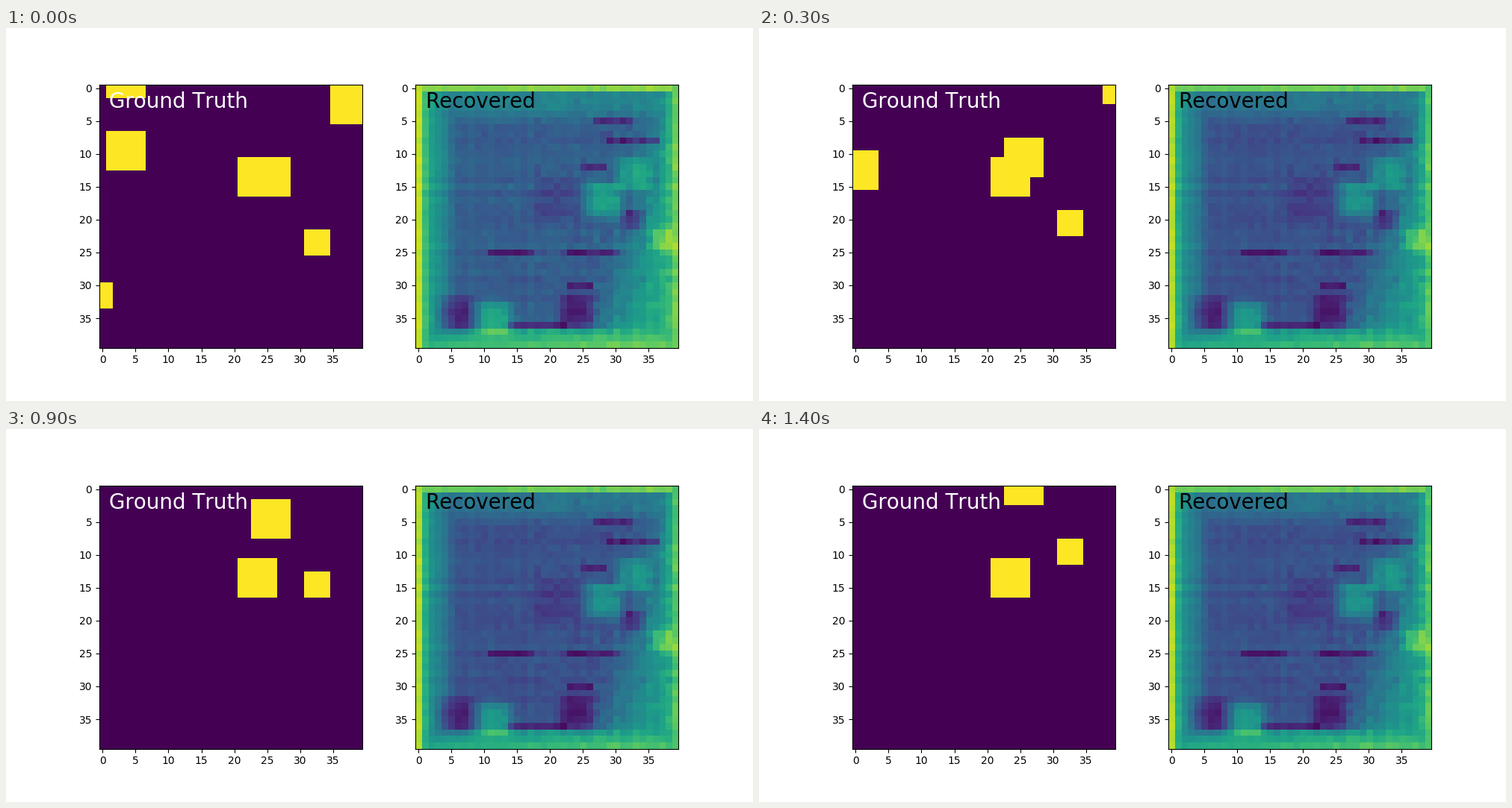
A matplotlib script that plays this animation: 1000 by 500 pixels, repeating every 1.5 s.

```python
import numpy as np
import matplotlib.pyplot as plt
from matplotlib.animation import FuncAnimation

SIZE = 40
FRAMES = 15
INTERVAL = 100

# Moving blocks of the truth map: row, column, size, row step, column step
BLOCKS = [
    (11, 21, 6, 0, 0),
    (11, 23, 6, -1, 0),
    (22, 31, 4, -1, 0),
    (0, 35, 6, -1, 1),
    (7, 1, 6, 1, -1),
    (30, -2, 4, 1, -1),
    (-4, 1, 6, -1, 0),
]

# Soft square clumps of the estimate: row, column, radius, change of level
CLUMPS = [
    (17, 28, 2.8, .26), (13, 32.5, 2.5, .24), (23, 37, 1.9, .2),
    (35, 11.5, 2.6, .28), (17, 21, 3.6, -.08), (20, 32.5, 1.6, -.2),
    (34, 24, 2.8, -.2), (34.5, 5.5, 2.7, -.19),
]
# Dark one-row streaks: row, first column, end column
STREAKS = [(5, 27, 33), (8, 29, 37), (12, 25, 29), (25, 23, 31),
           (25, 11, 18), (30, 23, 27), (36, 14, 23)]


def plateau(distance, width, power=6):
    return np.exp(-(np.abs(distance) / width) ** power)


def make_estimate():
    row, col = np.mgrid[:SIZE, :SIZE]
    from_right, from_bottom = SIZE - 1 - col, SIZE - 1 - row

    # Each border adds a glow, strongest on the outermost cells
    left = .45 * np.exp(-col / 1.1) + .18 * plateau(col, 5)
    top = .41 * np.exp(-3 * row) + .12 * plateau(row, 4.8, 8)
    right = .5 * np.exp(-from_right / 1.6)
    bottom = ((.32 * plateau(from_bottom, 2.6, 8) + .1 * np.exp(-from_bottom))
              * (.8 + .4 * col / SIZE))
    grid = .25 + np.maximum.reduce([left, top, right, bottom])

    # The inner part brightens towards the lower right
    slope = 1 / (1 + np.exp((40 - col - .3 * row) / 1.8))
    inner = (from_bottom > 2) & (from_right > 0)
    grid += inner * (.25 * slope * (1 - right / .5))

    for r, c, radius, change in CLUMPS:
        grid += change * plateau(row - r, radius, 4) * plateau(col - c, radius, 4)
    for r, start, end in STREAKS:
        grid[r, start:end] -= .17

    rng = np.random.default_rng(4)
    grid += rng.normal(0, .012, (SIZE, 1)) + rng.normal(0, .01, (1, SIZE))
    grid += rng.normal(0, .018, (SIZE, SIZE)) * (.4 + col / SIZE)
    return np.clip(grid, .03, .97)


ESTIMATE = make_estimate()


def truth(step):
    grid = np.zeros((SIZE, SIZE))
    for row, col, size, d_row, d_col in BLOCKS:
        r, c = row + step * d_row, col + step * d_col
        grid[max(r, 0):max(r + size, 0), max(c, 0):max(c + size, 0)] = 1
    return grid


def recovered(step):
    # The estimate starts slightly bright and settles quickly
    return ESTIMATE + .25 * np.exp(-1.1 * step) * ESTIMATE * (1 - ESTIMATE)


plt.rcParams["text.kerning_factor"] = 6
fig, axes = plt.subplots(1, 2, figsize=(10, 5), dpi=100)
maps = (truth, recovered)
images = [ax.imshow(make(0), cmap="viridis", vmin=0, vmax=1)
          for ax, make in zip(axes, maps)]
for ax, label, color in zip(axes, ("Ground Truth", "Recovered"), ("white", "black")):
    ax.set_xticks(range(0, SIZE, 5))
    ax.set_yticks(range(0, SIZE, 5))
    ax.text(1, 3, label, fontsize=20, color=color)


def update(step):
    for image, make in zip(images, maps):
        image.set_data(make(step))
    return images


anim = FuncAnimation(fig, update, frames=FRAMES, interval=INTERVAL,
                     repeat=True, repeat_delay=0)
plt.show()
```
